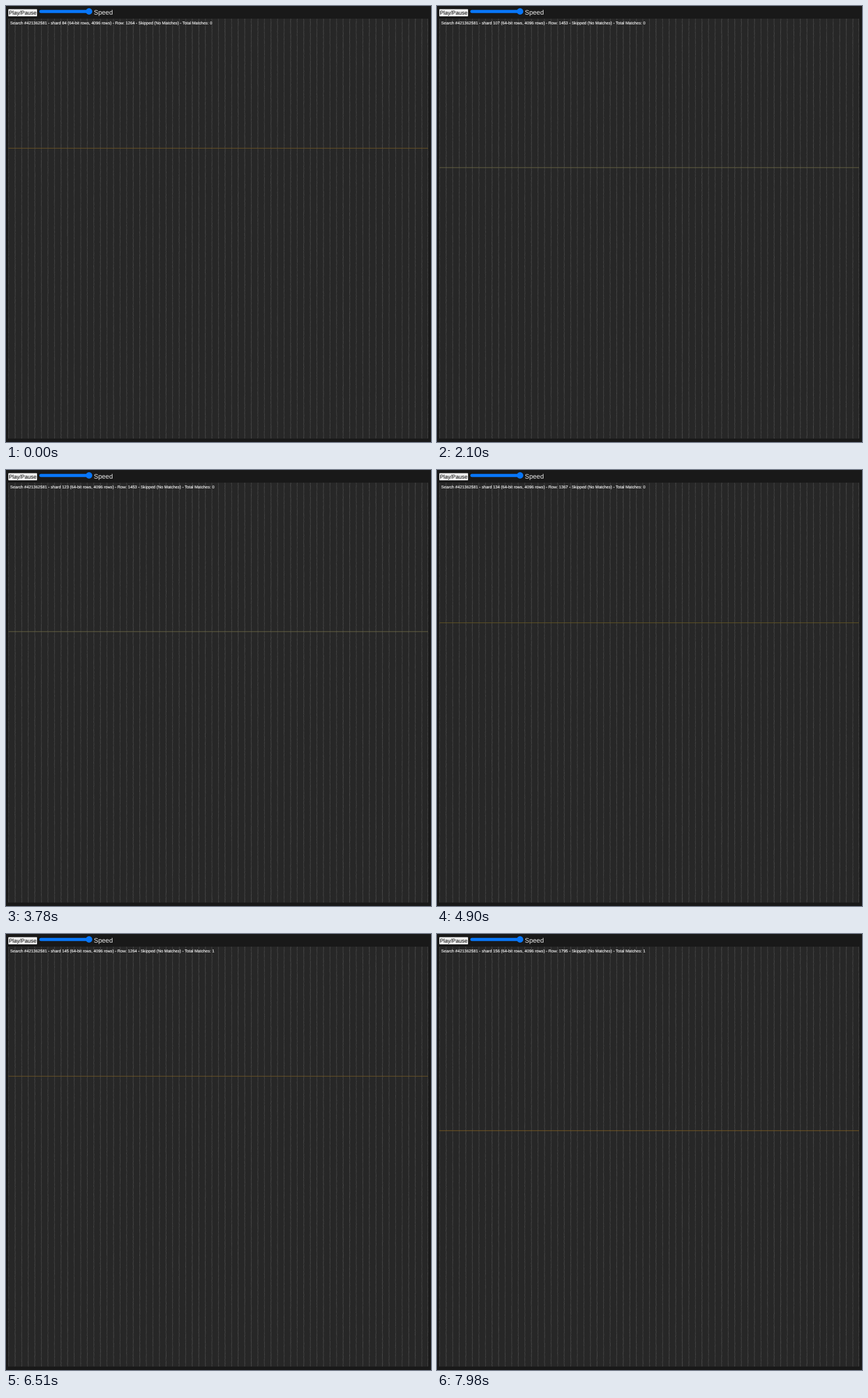
These frames come from a looping animation (739 px wide and 758 px high, 8000 ms). An HTML page with a canvas:

```html
<!DOCTYPE html>
<html lang="en">
<head>
<meta charset="utf-8">
<title>Shard search</title>
<style>
  html, body { margin: 0; width: 100%; height: 100%; overflow: hidden; background: #191919; }
  canvas, svg { position: absolute; left: 0; top: 0; display: block; }
  text { font-family: "Liberation Sans", Arial, sans-serif; text-rendering: geometricPrecision; }
</style>
</head>
<body>
<canvas id="grid" width="739" height="758"></canvas>
<svg width="739" height="758" viewBox="0 0 739 758">
  <rect x="4" y="5.5" width="50" height="12.5" rx="1" fill="#efefef"/>
  <text x="5" y="15.4" font-size="9.5" fill="#000">Play/Pause</text>
  <rect x="58" y="6.8" width="91" height="5.4" rx="2.7" fill="#0876f8"/>
  <circle cx="144.4" cy="9.4" r="5.6" fill="#0876f8"/>
  <text x="152.8" y="15" font-size="11.4" fill="#ececec">Speed</text>
  <rect id="scan" x="4" width="730" height="1"/>
  <text id="status" x="7.3" y="32.3" font-size="7.11" fill="#fff" stroke="#fff" stroke-width="0.12"></text>
</svg>
<script>
const LOOP = 8000, STEP = 70;
const BOARD = { x: 4, y: 22, size: 730, columns: 64, rows: 4096 };
const MATCH_SHARD = 140;

// Rows tested within a shard; `until` is the share of the shard's time at which each ends.
const tests = [
  { row: 1264, until: 0.42, color: '#6e5526' },
  { row: 1367, until: 0.6, color: '#645624' },
  { row: 1453, until: 0.84, color: '#6a6545' },
  { row: 1795, until: 1, color: '#7c5c20' }
];

// [time, shard progress]
const pace = [
  [0, 84.2], [1190, 95.2], [2100, 107.7], [3780, 123.7],
  [4900, 134.5], [6510, 145.2], [7980, 156.9]
];

const scan = document.getElementById('scan');
const status = document.getElementById('status');

function random(seed) {
  return () => {
    seed = (seed * 1664525 + 1013904223) >>> 0;
    return seed / 4294967296;
  };
}

function drawGrid() {
  const ctx = document.getElementById('grid').getContext('2d');
  const next = random(64);
  const { x, y, size, columns } = BOARD;
  ctx.fillStyle = '#272727';
  ctx.fillRect(x, y, size, size);
  for (let k = 0; k <= columns; k++) {
    const left = Math.min(x + k * size / columns, x + size - 1);
    const strength = 0.13 + 0.03 * next();
    for (let top = y; top < y + size;) {
      const run = Math.min(1 + Math.floor(next() * 3), y + size - top);
      const shift = (next() - 0.5) * 0.5;
      ctx.fillStyle = `rgba(255,255,255,${strength + (next() - 0.5) * 0.06})`;
      ctx.fillRect(left + shift, top, 1, run);
      top += run;
    }
  }
}

function progressAt(time) {
  const i = Math.max(1, pace.findIndex(([t]) => t >= time));
  const [t0, p0] = pace[i - 1], [t1, p1] = pace[i];
  return p0 + (p1 - p0) * (time - t0) / (t1 - t0);
}

function render(now) {
  const time = Math.floor(now % LOOP / STEP) * STEP;
  const progress = progressAt(time);
  const shard = Math.floor(progress);
  const { row, color } = tests.find(test => progress - shard < test.until);
  const matches = shard >= MATCH_SHARD ? 1 : 0;

  scan.setAttribute('y', BOARD.y + row / BOARD.rows * BOARD.size - 0.5);
  scan.setAttribute('fill', color);
  status.textContent = `Search #421362581 - shard ${shard} (64-bit rows, 4096 rows)` +
    ` - Row: ${row} - Skipped (No Matches) - Total Matches: ${matches}`;
}

drawGrid();
const start = performance.now();
function tick() {
  render(performance.now() - start);
  requestAnimationFrame(tick);
}
tick();
</script>
</body>
</html>
```
